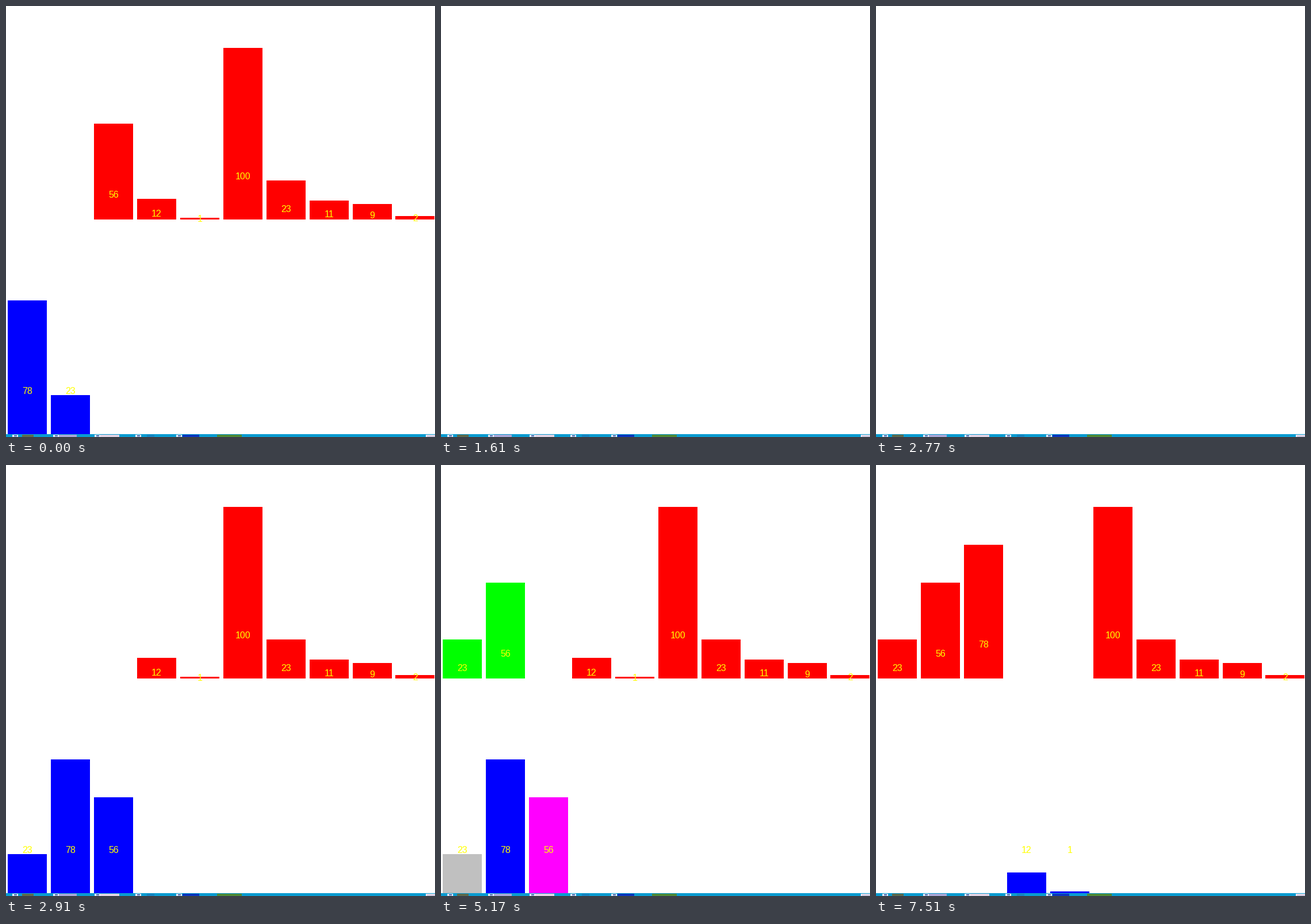
These frames come from a looping animation (746 px wide and 751 px high, 8000 ms). A matplotlib script:

```python
import matplotlib.pyplot as plt
from matplotlib.animation import FuncAnimation
from matplotlib.patches import Rectangle

W, H, DPI = 746, 751, 64
LOOP, STEP = 8000, 20
SLOTS, PITCH, LEFT, BAR_W = 10, 74.9, 3.3, 68
UNIT = 2.99
MAIN_BASE, WORK_BASE = 372.3, 746.3
FONT_PX = 16

COLORS = {"R": "#ff0000", "G": "#00ff00", "B": "#0000ff",
          "M": "#ff00ff", "S": "#c0c0c0"}


def row(start, values, keys):
    """Map slot -> (value, colour) for a run of bars."""
    return {start + i: (v, COLORS[k]) for i, (v, k) in enumerate(zip(values, keys))}


REST = row(5, [100, 23, 11, 9, 2], "RRRRR")
FROM_3 = row(3, [12, 1], "RR") | REST
FROM_2 = row(2, [56], "R") | FROM_3

# cleared at, main row back at, work row back at, main row, work row
STAGES = [
    (0, 0, 0, FROM_2, row(0, [78, 23], "BB")),
    (430, 510, 590, row(0, [23], "G") | FROM_2, row(0, [78, 23], "BM")),
    (1610, 1680, 1750, row(0, [23, 78], "GG") | FROM_2, row(0, [78, 23], "SM")),
    (2770, 2840, 2910, FROM_3, row(0, [23, 78, 56], "BBB")),
    (3930, 4010, 4010, row(0, [23], "G") | FROM_3, row(0, [23, 78, 56], "SBB")),
    (5090, 5170, 5170, row(0, [23, 56], "GG") | FROM_3, row(0, [23, 78, 56], "SBM")),
    (6270, 6340, 6410, row(0, [23, 56, 78], "GGG") | FROM_3,
     row(0, [23, 78, 56], "SSM")),
    (7430, 7510, 7510, row(0, [23, 56, 78], "RRR") | REST, row(3, [12, 1], "BB")),
]

fig = plt.figure(figsize=(W / DPI, H / DPI), dpi=DPI, facecolor="white")
ax = fig.add_axes([0, 0, 1, 1])
ax.set(xlim=(0, W), ylim=(H, 0))
ax.axis("off")


def block(x0, x1, color, y=747, bottom=H):
    ax.add_patch(Rectangle((x0, y), x1 - x0, bottom - y, fc=color, lw=0, zorder=3))


def draw_strip():
    block(0, W, "#0a9bd0", 746.4)
    block(28, 48, "#5d6a4c")
    block(92, 123, "#a9a6d6")
    block(163, 197, "#e3d3e3")
    block(245, 258, "#1583c0")
    block(307, 336, "#0b35bd")
    block(367, 410, "#4f8a35")
    for i in range(5):
        x = 11 + 71.3 * i
        block(x, x + 10, "#e6ecf6")
        block(x + 3, x + 8, "#3a5da8", 748, 750)
    block(730, W, "#ece6f2")
    block(732, W, "#a99fc0", 749, 750)


class Row:
    def __init__(self, base):
        self.base = base
        self.bars, self.labels = [], []
        for i in range(SLOTS):
            x = LEFT + PITCH * i
            bar = Rectangle((x, base), BAR_W, 0, lw=0, zorder=1)
            self.bars.append(ax.add_patch(bar))
            self.labels.append(ax.text(
                x + BAR_W / 2, base, "", color="#ffff00", ha="center",
                va="baseline", family="Liberation Sans",
                size=FONT_PX * 72 / DPI, zorder=2))

    def label_y(self, value):
        if self.base == WORK_BASE:
            return 675.5
        return self.base + 4 - value * UNIT / 4

    def show(self, items):
        for i, (bar, label) in enumerate(zip(self.bars, self.labels)):
            on = i in items
            bar.set_visible(on)
            label.set_visible(on)
            if on:
                value, color = items[i]
                bar.set_y(self.base - value * UNIT)
                bar.set_height(value * UNIT)
                bar.set_facecolor(color)
                label.set_text(str(value))
                label.set_y(self.label_y(value))


draw_strip()
main, work = Row(MAIN_BASE), Row(WORK_BASE)


def update(n):
    t = n * STEP + STEP / 2
    _, main_at, work_at, main_bars, work_bars = [s for s in STAGES if s[0] <= t][-1]
    main.show(main_bars if t >= main_at else {})
    work.show(work_bars if t >= work_at else {})
    return main.bars + main.labels + work.bars + work.labels


anim = FuncAnimation(fig, update, frames=LOOP // STEP, interval=STEP,
                     init_func=lambda: update(0), repeat=True, repeat_delay=0)
plt.show()
```
